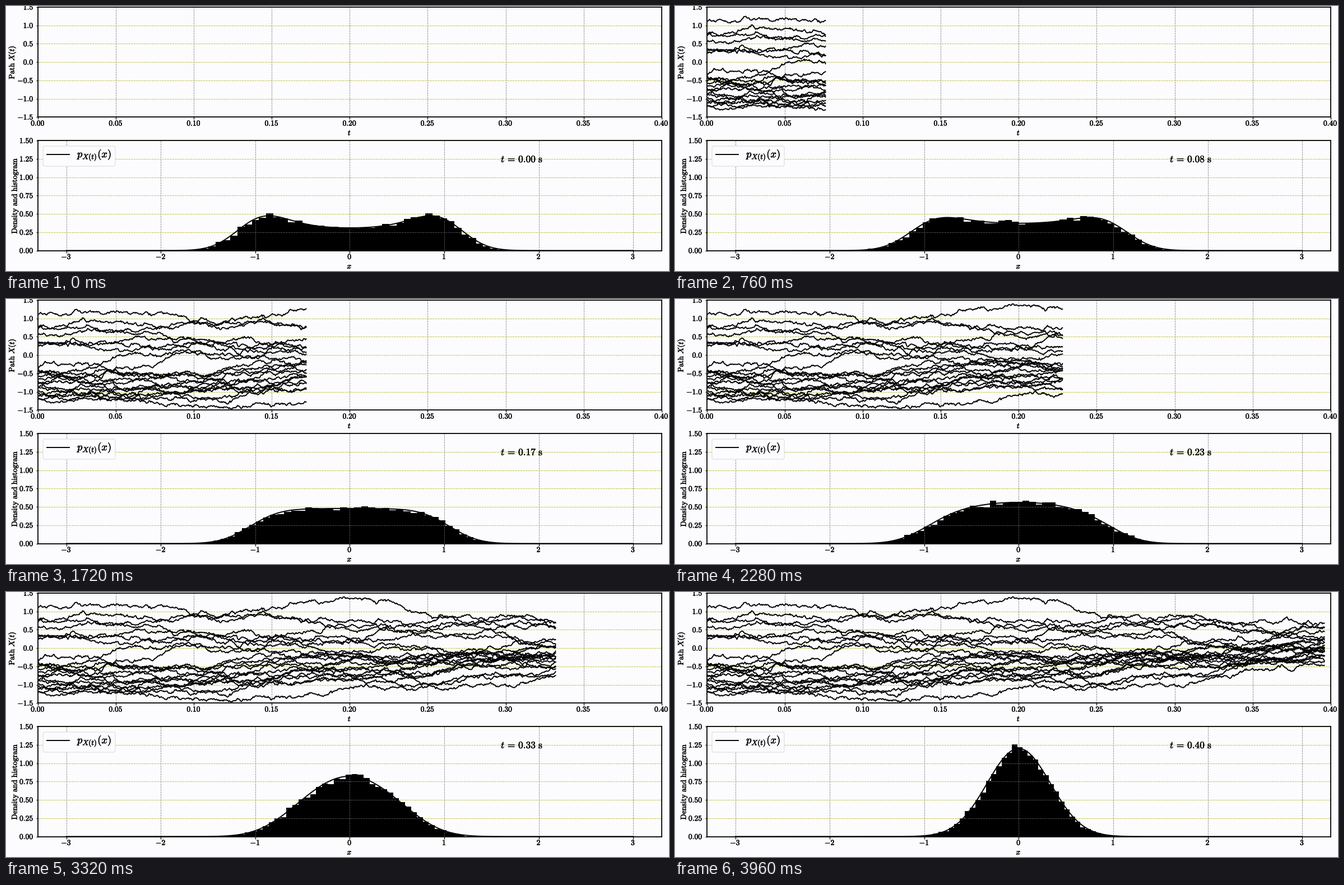
These frames come from a looping animation (1183 px wide and 473 px high, 4000 ms). A matplotlib script:

```python
import numpy as np
import matplotlib.pyplot as plt
from matplotlib.animation import FuncAnimation
from matplotlib.patches import FancyBboxPatch
from matplotlib.patheffects import withStroke

W, H, DPI = 1183, 473, 64
FRAMES, DT = 100, 0.004
SUB = 10  # path steps per frame
BG, GRID_X, GRID_Y, GRID_IN = "#fcfcfe", "#98989c", "#c4c44c", "#4c4c4c"
SPREAD, NOISE = 1.06, 0.245
UPPER = (57, 2, 1169.7, 198.3)  # left, top, right, bottom in pixels
LOWER = (57, 240.3, 1169.7, 436.5)

plt.rcParams["mathtext.fontset"] = "cm"
rng = np.random.default_rng(12)


def pt(px):
    return px * 72 / DPI


# Sample paths: Brownian bridges pinned at a few points
times = np.arange(FRAMES * SUB) * DT / SUB


def bridge(knots, values):
    step = DT / SUB
    walk = np.cumsum(rng.normal(0, 0.8 * np.sqrt(step), times.size))
    drift = np.interp(times, knots, np.interp(knots, times, walk))
    return walk - drift + np.interp(times, knots, values)


def shrinking_path(start):
    middle = 0.05 + 0.8 * start + rng.normal(0, 0.1)
    end = 0.15 + 0.35 * start + rng.normal(0, 0.14)
    return bridge([0, 0.2, 0.396], [start, middle, end])


starts = np.r_[0.8, 0.75, 0.55, 0.38, 0.3, 0.27, np.linspace(-0.3, -1.18, 14)]
paths = [
    bridge([0, .05, .083, .112, .155, .196, .224, .25, .284, .305, .396],
           [1.1, 1.17, 1.15, .78, 1.1, 1.4, 1.3, .92, .74, .88, .68]),
    bridge([0, .045, .086, .12, .172, .21, .265, .3, .37, .396],
           [-1.22, -1.05, -1.32, -1.42, -1.28, -1.0, -1.1, -1.0, -.5, -.47]),
]
paths += [shrinking_path(s) for s in starts]

# Density: a symmetric beta law, from arcsine to bell shape, blurred by noise
theta = (np.arange(400) + 0.5) / 400 * np.pi - np.pi / 2
centres = SPREAD * np.sin(theta)
xs = np.linspace(-3, 3, 501)
kernel = np.exp(-0.5 * ((xs[:, None] - centres) / NOISE) ** 2)
kernel /= NOISE * np.sqrt(2 * np.pi)


def weights(t):
    w = np.cos(theta) ** (1.54 * t / (0.425 - t))
    return w / w.sum()


def make_histograms(count=20000, bins=50, keep=0.95):
    u = rng.random(count)
    z = rng.normal(size=count)
    result = []
    for k in range(FRAMES):
        w = weights(k * DT)
        x = np.interp(u, np.cumsum(w) - w / 2, centres) + NOISE * z
        result.append(np.histogram(x, bins=bins, density=True))
        u = 1 - np.abs(1 - np.abs(u + rng.normal(0, 0.05, count)))
        z = keep * z + np.sqrt(1 - keep ** 2) * rng.normal(size=count)
    return result


densities = [kernel @ weights(k * DT) for k in range(FRAMES)]
histograms = make_histograms()

# Stage
fig = plt.figure(figsize=(W / DPI, H / DPI), dpi=DPI, facecolor=BG)
stage = fig.add_axes([0, 0, 1, 1], zorder=5)
stage.set(xlim=(0, W), ylim=(H, 0))
stage.axis("off")
heavy = [withStroke(linewidth=pt(0.45), foreground="black")]


def label(x, y, text, size=13.6, **kw):
    style = dict(ha="center", va="baseline", color="black", path_effects=heavy)
    style.update(kw)
    return stage.text(x, y, f"${text}$", fontsize=pt(size), **style)


def panel(box, xticks, yticks, x_format, y_format, xlim):
    left, top, right, bottom = box
    ax = fig.add_axes([left / W, 1 - bottom / H, (right - left) / W, (bottom - top) / H])
    ax.set(facecolor=BG, xlim=xlim, ylim=(yticks[0], yticks[-1]),
           xticks=xticks, yticks=yticks)
    ax.set_axisbelow(True)
    for spine in ax.spines.values():
        spine.set_linewidth(pt(1.8))
    ax.tick_params(length=pt(3.5), width=pt(1.3), labelbottom=False, labelleft=False)
    for axis, color in (("x", GRID_X), ("y", GRID_Y)):
        ax.grid(axis=axis, color=color, lw=pt(1), ls=(0, (3.4, 1.2)))
    for px, v in zip(np.interp(xticks, xlim, (left, right)), xticks):
        label(px, bottom + 15.2, format(v, x_format))
    for py, v in zip(np.linspace(bottom, top, len(yticks)), yticks):
        label(49.5, py + 4.5, format(v, y_format), ha="right")
    return ax


upper = panel(UPPER, np.arange(9) * 0.05, np.arange(-3, 4) * 0.5, ".2f", ".1f", (0, 0.4))
lower = panel(LOWER, np.arange(-3, 4), np.arange(7) * 0.25, "d", ".2f", (-3.3, 3.3))

label(613, 230.5, "t")
label(613, 468.5, "x")
label(11, 100.5, r"\mathrm{Path}\ X(t)", rotation=90, va="center")
label(16, 338.5, r"\mathrm{Density\ and\ histogram}", rotation=90, va="center")

stage.add_patch(FancyBboxPatch((69.5, 253.5), 122, 29, boxstyle="round,pad=3.5,rounding_size=3.5",
                               fc=BG, ec="#dcdcdc", lw=pt(1.1)))
stage.plot([73, 113], [264.7, 264.7], color="black", lw=pt(1.9))
label(127, 270, "p_{X(t)}(x)", 18.6, ha="left")
clock = label(883, 278.8, "", 17.4, ha="left")

# Moving parts
lines = [upper.plot([], [], color="black", lw=pt(1.9))[0] for _ in paths]
bars = lower.stairs(*histograms[0], fill=True, color="black", lw=0, zorder=2)
curve, = lower.plot(xs, densities[0], color="black", lw=pt(2), zorder=4)
dash = dict(color=GRID_IN, lw=pt(1), ls=(0, (3.4, 1.2)), zorder=3)
inner_grid = [lower.axhline(y, **dash) for y in lower.get_yticks()[1:]]
inner_grid += [lower.axvline(x, **dash) for x in lower.get_xticks()]


def update(k):
    shown = k * SUB + 1 if k else 0
    for line, path in zip(lines, paths):
        line.set_data(times[:shown], path[:shown])
    bars.set_data(*histograms[k])
    for line in inner_grid:
        line.set_clip_path(bars)
    curve.set_ydata(densities[k])
    clock.set_text(rf"$t\,=\,{k * DT:.2f}\ \mathrm{{s}}$")
    return lines + [bars, curve, clock]


anim = FuncAnimation(fig, update, frames=FRAMES, interval=40, repeat=True, repeat_delay=0)
plt.show()
```
